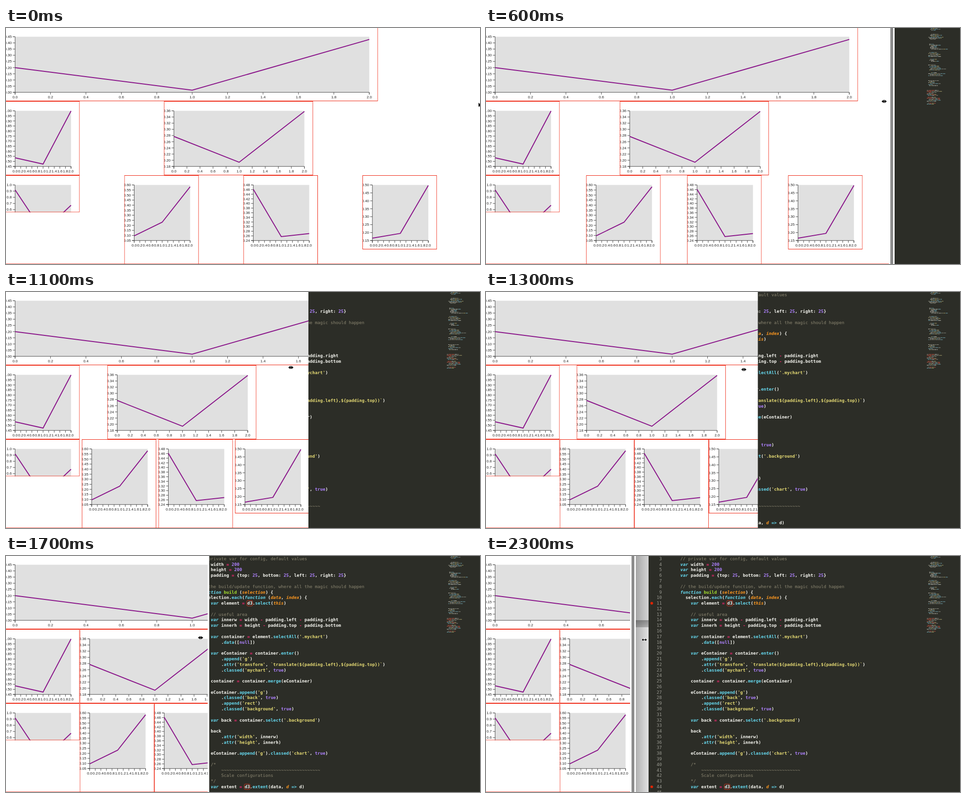
Animation of 1000x500 px, one loop 3300 ms. Source, as an HTML page:

```html
<!DOCTYPE html>
<html lang="en">
<head>
<meta charset="utf-8">
<title>Responsive charts beside an editor</title>
<style>
  html, body { margin: 0; width: 100%; height: 100%; overflow: hidden; background: #fff; }
  #stage { display: block; width: 100%; height: 100%; }
  .axis { font: 7.85px "Liberation Sans", Arial, sans-serif; fill: #222; }
  .tick { fill: none; stroke: #222; stroke-width: .8; }
  .plot { fill: #e0e0e0; }
  .line { fill: none; stroke: #8a168a; stroke-width: 2; }
  .frame { fill: none; stroke: #ee2410; }
  .code { font: bold 9.136px "DejaVu Sans Mono", monospace; fill: #f8f8f2; white-space: pre; }
  .num { font-weight: normal; fill: #9a9a92; text-anchor: end; }
  .comment { font-weight: normal; fill: #8c8772; }
  .str { fill: #e6db74; }
  .key { fill: #66d9ef; font-style: italic; }
  .call { fill: #66d9ef; }
  .name { fill: #a6e22e; }
  .param { fill: #fd971f; font-style: italic; }
  .const { fill: #ae81ff; }
  .op { fill: #f92672; }
</style>
</head>
<body>
<svg id="stage" viewBox="0 0 1000 500" preserveAspectRatio="none">
  <defs>
    <linearGradient id="shade">
      <stop stop-color="#000" stop-opacity=".22"/>
      <stop offset="1" stop-color="#000" stop-opacity="0"/>
    </linearGradient>
    <linearGradient id="band" x2="0" y2="1">
      <stop stop-color="#8f8f8f"/>
      <stop offset="1" stop-color="#b4b4b4"/>
    </linearGradient>
  </defs>
  <rect width="1000" height="500" fill="#e2e2e2"/>
  <rect width="1000" height="136" fill="#d4d4d4"/>
  <rect y="136" width="1000" height="15" fill="url(#band)"/>
  <rect id="shadow" width="27" height="500" fill="url(#shade)"/>
  <rect id="window" width="1016" height="500" fill="#fff"/>
  <svg id="page" width="1004" height="500"></svg>
  <rect id="thumb" width="6" height="500" fill="#8c8c8c"/>
  <svg id="editor" width="1000" height="500"></svg>
  <path id="arrow" d="M996.5 157.5v10.5l2.4-2.3 1.7 3.9 2-.9-1.7-3.8h3.3z" stroke="#fff" stroke-width=".8"/>
  <g id="resize" stroke="#fff" stroke-width="1.2" paint-order="stroke">
    <path d="M-5.5 0l3.5-2.8v2h4v-2l3.5 2.8-3.5 2.8v-2h-4v2z"/>
    <path id="bars" d="M-1.7-3.2h1.2v6.4h-1.2zM.5-3.2h1.2v6.4h-1.2z" stroke="none"/>
  </g>
</svg>
<script>
const NS = 'http://www.w3.org/2000/svg';
const byId = id => document.getElementById(id);
const LOOP = 3300, STEP = 100;
const LEFT = -1.8, CELL = 157.3, ROW = 157, PLOT_H = 117.75;

function add(parent, tag, attrs, text) {
  const el = document.createElementNS(NS, tag);
  for (const key in attrs) el.setAttribute(key, attrs[key]);
  if (text !== undefined) el.textContent = text;
  parent.appendChild(el);
  return el;
}

// Charts: span counts cells across, tall counts rows down
const page = byId('page');
const charts = [
  { row: 0, col: 0, span: 5, lo: 0, hi: .45, values: [.2, .017, .428] },
  { row: 1, col: 0, lo: .45, hi: 1, values: [.535, .473, .999] },
  { row: 1, col: 1, span: 2, lo: .18, hi: .36, step: .02, values: [.277, .1935, .358] },
  { row: 2, col: 0, tall: .5, lo: .1, hi: 1, step: .1, values: [.92, .24, .672] },
  { row: 2, col: 1, tall: 2, lo: .05, hi: .6, values: [.096, .231, .582] },
  { row: 2, col: 2, tall: 2, lo: .24, hi: .48, step: .02, values: [.461, .257, .27] },
  { row: 2, col: 3, lo: .15, hi: .5, values: [.165, .195, .497] }
];

function drawChart(chart) {
  const { row, span = 1, tall = 1, lo, hi, step = .05, values } = chart;
  const w = CELL * span, h = ROW * tall, plotW = w - 39.3;
  const box = add(page, 'svg', { x: LEFT, y: ROW * row - 2, width: w, height: h });
  const g = add(box, 'g', { transform: 'translate(21 20.5)' });
  const yOf = v => PLOT_H * (hi - v) / (hi - lo);
  let ticks = `M-4.7 0H0V${PLOT_H}H-4.7M0 ${PLOT_H + 4.7}V${PLOT_H}H${plotW}v4.7`;
  add(g, 'rect', { class: 'plot', width: plotW, height: PLOT_H });
  for (let v = lo; v < hi + step / 2; v += step) {
    const y = yOf(v);
    ticks += `M-4.7 ${y}H0`;
    add(g, 'text', { class: 'axis', x: -7, y: y + 2.6, 'text-anchor': 'end' }, v.toFixed(step < .1 ? 2 : 1));
  }
  for (let i = 0; i <= 10; i++) {
    const x = plotW * i / 10;
    ticks += `M${x} ${PLOT_H}v4.7`;
    add(g, 'text', { class: 'axis', x, y: PLOT_H + 12.7, 'text-anchor': 'middle' }, (i / 5).toFixed(1));
  }
  add(g, 'path', { class: 'tick', d: ticks });
  add(g, 'polyline', { class: 'line', points: values.map((v, i) => `${plotW * i / 2},${yOf(v)}`).join(' ') });
  add(box, 'rect', { class: 'frame', x: .5, y: .5, width: w - 1, height: h - 1 });
  chart.box = box;
}
charts.forEach(drawChart);
add(page, 'path', { class: 'frame', d: 'M0 499.5H1010', opacity: .7 });

// Editor; @name@ marks a parameter
const source = `// private var for config, default values
var width = 200
var height = 200
var padding = {top: 25, bottom: 25, left: 25, right: 25}

// the build/update function, where all the magic should happen
function build (@selection@) {
  selection.each(function (@data@, @index@) {
    var element = d3.select(@this@)

    // useful area
    var innerw = width - padding.left - padding.right
    var innerh = height - padding.top - padding.bottom

    var container = element.selectAll('.mychart')
        .data([null])

    var eContainer = container.enter()
        .append('g')
        .attr('transform', \`translate(\${padding.left},\${padding.top})\`)
        .classed('mychart', true)

    container = container.merge(eContainer)

    eContainer.append('g')
        .classed('back', true)
        .append('rect')
        .classed('background', true)

    var back = container.select('.background')

    back
        .attr('width', innerw)
        .attr('height', innerh)

    eContainer.append('g').classed('chart', true)

    /*
        ${'~'.repeat(38)}
        Scale configurations
    */
    var extent = d3.extent(data, @d@ => d)
`.split('\n');

const rules = [
  ['str', "'[^']*'|`[^`]*`"],
  ['param', '@\\w+@'],
  ['name', '(?<=function )\\w+'],
  ['key', '\\b(?:var|function)\\b|=>'],
  ['call', '(?<=\\.)\\w+(?=\\()'],
  ['const', '\\b(?:\\d+|true|null)\\b'],
  ['op', '[=-]']
];
const lexer = new RegExp(rules.map(([name, re]) => `(?<${name}>${re})`).join('|'), 'g');

function highlight(el, line) {
  let end = 0;
  for (const m of line.matchAll(lexer)) {
    add(el, 'tspan', {}, line.slice(end, m.index));
    const kind = rules.find(([name]) => m.groups[name] !== undefined)[0];
    add(el, 'tspan', { class: kind }, m[0].replace(/@/g, ''));
    end = m.index + m[0].length;
  }
  add(el, 'tspan', {}, line.slice(end));
}

const editor = byId('editor');
add(editor, 'rect', { width: 1000, height: 500, fill: '#2c2d27' });
const marks = add(editor, 'g', { fill: '#e32402' });
const FIRST = 3, CHAR = 5.5;
let inComment = false;
source.forEach((line, i) => {
  const n = i + FIRST, mid = 5.5 + i * 11.785, y = mid + 3.3;
  add(editor, 'text', { class: 'code num', x: 371, y }, n);
  const text = add(editor, 'text', { class: 'code', x: 410, y });
  if (line.includes('/*')) inComment = true;
  if (inComment || /^\s*\/\//.test(line)) add(text, 'tspan', { class: 'comment' }, line);
  else highlight(text, line);
  if (line.includes('*/')) inComment = false;

  const at = line.indexOf('d3');
  if (at >= 0) {
    add(marks, 'circle', { cx: 349.7, cy: mid + .3, r: 2.8 });
    add(editor, 'rect', {
      x: 409 + at * CHAR, y: mid - 5.5, width: 12.5, height: 11.5, rx: 2.5, fill: 'none', stroke: '#c8321e'
    });
  }
});

// Overview strip: short blocks of tiny lines, redder towards the end
let seed = 7;
const random = () => (seed = seed * 16807 % 2147483647) / 2147483647;
const tints = ['#c2c2b8', '#a39c68', '#70a3ae', '#8b8c80'];
for (let y = 0; y < 162;) {
  const late = y > 125;
  for (let n = 2 + random() * 4; n > 0 && y < 162; n--, y += 2.1) {
    let x = (late ? 930 : 933) + Math.floor(random() * 4) * 2;
    const end = x + 10 + 25 * random() ** 2;
    while (x < end) {
      const len = 2 + random() * 4;
      const fill = late && random() < .35 ? '#c4513f' : tints[Math.floor(random() * 4)];
      add(editor, 'rect', { x, y, width: len, height: 1, fill });
      x += len + .8;
    }
  }
  y += late ? 2 : 3 + random() * 6;
}

// Drag keys: time, page width, editor edge, cursor x
const drag = [
  [200, 1005, 1016, 1005], [300, 998, 998, 982], [600, 852, 862, 840],
  [800, 774, 763, 745], [1100, 646.5, 638, 601], [1500, 512, 509, 487],
  [1900, 343, 349, 334], [2000, 338, 343, 334], [2300, 306, 343, 334]
];

function pose(t) {
  const time = Math.min(Math.max(t, drag[0][0]), drag[drag.length - 1][0]);
  const i = Math.max(1, drag.findIndex(key => key[0] >= time));
  const a = drag[i - 1], b = drag[i];
  const p = (time - a[0]) / (b[0] - a[0]);
  return a.map((v, k) => v + (b[k] - v) * p);
}

const set = (id, name, value) => byId(id).setAttribute(name, value);
const show = (id, on) => set(id, 'visibility', on ? 'visible' : 'hidden');

function draw(t) {
  const [, width, edge, cursor] = pose(t);
  const right = width - 2;
  const pitch = [0, Math.max(CELL, width / 3), Math.max(CELL, width / 4)];
  charts.forEach(c => c.box.setAttribute('x', LEFT + c.col * pitch[c.row]));
  set('page', 'width', right);
  set('window', 'width', right + 12);
  set('shadow', 'x', right + 12);
  set('thumb', 'x', right + 3);
  editor.style.clipPath = `inset(0 0 0 ${Math.min(edge, 1000)}px)`;
  marks.setAttribute('opacity', edge > 345 ? .55 : 1);
  show('arrow', t < 100);
  show('resize', t >= 300);
  show('bars', t >= 300 && t < 1800);
  const cursorY = 155.5 + Math.min(22, Math.max(0, (t - 900) * .022));
  set('resize', 'transform', `translate(${cursor} ${cursorY})`);
}

const start = performance.now();
function tick() {
  const t = (performance.now() - start) % LOOP;
  draw(Math.floor(t / STEP) * STEP);
  requestAnimationFrame(tick);
}
tick();
</script>
</body>
</html>
```
